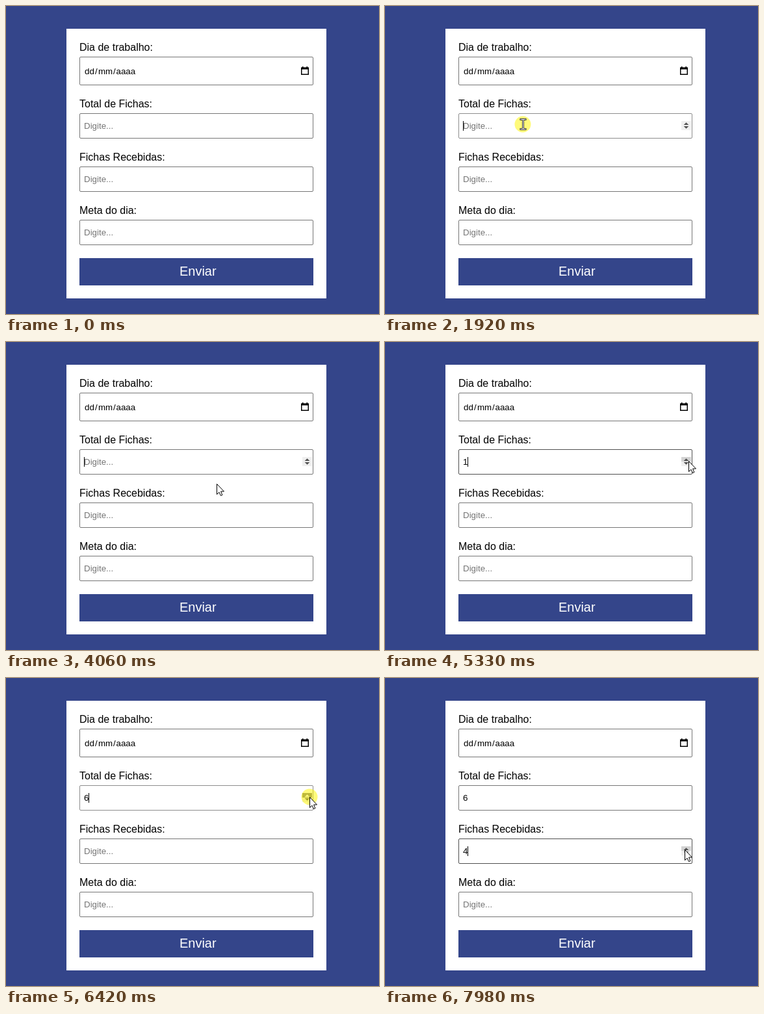
Animation, 574 px wide and 474 px high, one loop 8000 ms. Source, as an HTML page with a canvas:

```html
<!DOCTYPE html>
<html lang="pt">
<head>
<meta charset="utf-8">
<title>Formulário</title>
<style>
  html, body { margin: 0; width: 574px; height: 474px; overflow: hidden; background: #34458a; }
  svg, canvas { position: absolute; left: 0; top: 0; display: block; }
  text { font-family: "Liberation Sans", Arial, sans-serif; font-size: 16px; fill: #000; }
  text.small { font-size: 13.333px; }
  text.hint { fill: #757575; }
  text.send { font-size: 20px; fill: #fff; }
</style>
</head>
<body>
<svg width="574" height="474" viewBox="0 0 574 474">
  <rect x="93" y="35" width="400" height="415" fill="#fff"/>
  <rect x="113" y="388" width="360" height="42" fill="#34458a"/>
  <text x="113" y="69">Dia de trabalho:</text>
  <text x="113" y="156">Total de Fichas:</text>
  <text x="113" y="238">Fichas Recebidas:</text>
  <text x="113" y="320">Meta do dia:</text>
  <text class="small" y="105"><tspan x="121">dd</tspan><tspan x="137">/</tspan><tspan x="142">mm</tspan><tspan x="165">/</tspan><tspan x="169.5">aaaa</tspan></text>
  <text class="small hint" id="v1" x="120" y="189">Digite...</text>
  <text class="small hint" id="v2" x="120" y="271">Digite...</text>
  <text class="small hint" x="120" y="353">Digite...</text>
  <text class="send" x="295.3" y="415" text-anchor="middle">Enviar</text>
  <path d="M454.75 95.5H465.25V105.25H454.75Z" fill="none" stroke="#000" stroke-width="1.5"/>
  <path d="M454 94.5H466V97.5H454ZM456 93H457.5V95H456ZM462.5 93H464V95H462.5Z"/>
</svg>
<canvas id="stage" width="574" height="474"></canvas>
<script>
const LOOP = 8000;
const ctx = document.getElementById('stage').getContext('2d');

// Inputs: top edge and height
const fields = [
  { y: 78, h: 44 },
  { y: 165, h: 39, label: document.getElementById('v1') },
  { y: 247, h: 39, label: document.getElementById('v2') },
  { y: 329, h: 39 }
];

// Pointer moves: begin, end, steps, destination, optional control point
const origin = [559, 541];
const moves = [
  [500, 780, 5, [272, 150], [470, 290]],
  [920, 1180, 5, [250, 106]],
  [1520, 1790, 5, [212, 182]],
  [2190, 2260, 2, [217, 181]],
  [3770, 4390, 10, [459, 184], [310, 253.5]],
  [4590, 4800, 4, [467, 183]],
  [6560, 6980, 7, [462, 263]],
  [7250, 7251, 1, [461, 264]]
];

// Clicks: time, duration, field, resulting value
const clicks = [
  [1920, 70, 1, ''],
  [5060, 70, 1, '1'], [5400, 70, 1, '2'], [5600, 70, 1, '3'],
  [5870, 70, 1, '4'], [6160, 60, 1, '5'], [6420, 80, 1, '6'],
  [7310, 60, 2, '1'], [7510, 60, 2, '2'], [7720, 60, 2, '3'], [7920, 60, 2, '4']
];

function pointerAt(t) {
  let from = origin;
  for (const [begin, end, steps, to, ctrl] of moves) {
    if (t < begin) break;
    const n = Math.floor((t - begin) / (end - begin) * (steps - 1)) + 1;
    const k = Math.min(1, n / steps);
    if (k === 1) { from = to; continue; }
    return from.map((a, i) => {
      const c = ctrl ? ctrl[i] : (a + to[i]) / 2;
      return Math.round((1 - k) * (1 - k) * a + 2 * k * (1 - k) * c + k * k * to[i]);
    });
  }
  return from;
}

function triangle(x, y, dir, color) {
  ctx.fillStyle = color;
  ctx.beginPath();
  ctx.moveTo(x - 3.8, y);
  ctx.lineTo(x + 3.8, y);
  ctx.lineTo(x, y + 3.8 * dir);
  ctx.fill();
}

function spinner(top, over, pressed) {
  ctx.fillStyle = '#efefef';
  ctx.fillRect(456, top, 15, 14);
  if (over) {
    ctx.fillStyle = pressed ? '#787878' : '#d2d2d2';
    ctx.fillRect(456, top, 15, 7);
  }
  triangle(463.5, top + 6, -1, over && pressed ? '#fff' : '#505050');
  triangle(463.5, top + 8, 1, '#505050');
}

function arrow(x, y) {
  ctx.save();
  ctx.translate(x, y);
  ctx.beginPath();
  const pts = [[.5, .5], [.5, 16.5], [4, 13.2], [6.5, 18.5], [8.9, 17.5], [6.6, 12], [11.5, 12]];
  pts.forEach(p => ctx.lineTo(...p));
  ctx.closePath();
  ctx.fillStyle = '#fff';
  ctx.fill();
  ctx.lineWidth = 1;
  ctx.strokeStyle = '#000';
  ctx.stroke();
  ctx.restore();
}

function beam(x, y) {
  ctx.save();
  ctx.translate(x, y);
  for (const [color, w, e] of [['#333', 3, 5], ['#fff', 1, 4]]) {
    ctx.strokeStyle = color;
    ctx.lineWidth = w;
    ctx.beginPath();
    ctx.moveTo(.5, -7.5);
    ctx.lineTo(.5, 7.5);
    for (const s of [-7.5, 7.5]) {
      ctx.moveTo(.5 - e, s);
      ctx.lineTo(.5 + e, s);
    }
    ctx.stroke();
  }
  ctx.restore();
}

function setValue(el, value) {
  const text = value || 'Digite...';
  if (el.textContent !== text) el.textContent = text;
  el.classList.toggle('hint', !value);
}

function draw(t) {
  ctx.clearRect(0, 0, 574, 474);
  const [mx, my] = pointerAt(t);
  const values = ['', '', ''];
  let last = null;
  for (const c of clicks) {
    if (t < c[0]) break;
    last = c;
    values[c[2]] = c[3];
  }
  const focus = last ? last[2] : -1;
  const pressed = !!last && t < last[0] + last[1];
  const hover = t < 500 ? -1
    : fields.findIndex(f => mx >= 113 && mx < 473 && my >= f.y && my < f.y + f.h);

  fields.forEach((f, i) => {
    ctx.lineWidth = 1;
    ctx.strokeStyle = hover !== i ? '#767676' : pressed ? '#8d8d8d' : '#4f4f4f';
    ctx.beginPath();
    ctx.roundRect(113.5, f.y + .5, 359, f.h - 1, 1.5);
    ctx.stroke();
    if (f.label) setValue(f.label, values[i]);
    if (i && (i === hover || i === focus)) {
      spinner(f.y + 12, i === hover && mx >= 456, pressed);
    }
  });

  if (last) {
    const idle = Math.max(0, t - last[0] - 34);
    if (Math.floor(idle / 516) % 2 === 0) {
      ctx.fillStyle = '#000';
      ctx.fillRect(values[focus] ? 127 : 120, fields[focus].y + 12, 1, 15);
    }
  }
  if (pressed) {
    ctx.fillStyle = 'rgba(255,245,0,.52)';
    ctx.beginPath();
    ctx.arc(mx, my, 12.5, 0, Math.PI * 2);
    ctx.fill();
  }
  if (t >= 500) (hover > 0 && mx < 456 ? beam : arrow)(mx, my);
}

const start = performance.now();
function tick() {
  draw((performance.now() - start) % LOOP);
  requestAnimationFrame(tick);
}
tick();
</script>
</body>
</html>
```
